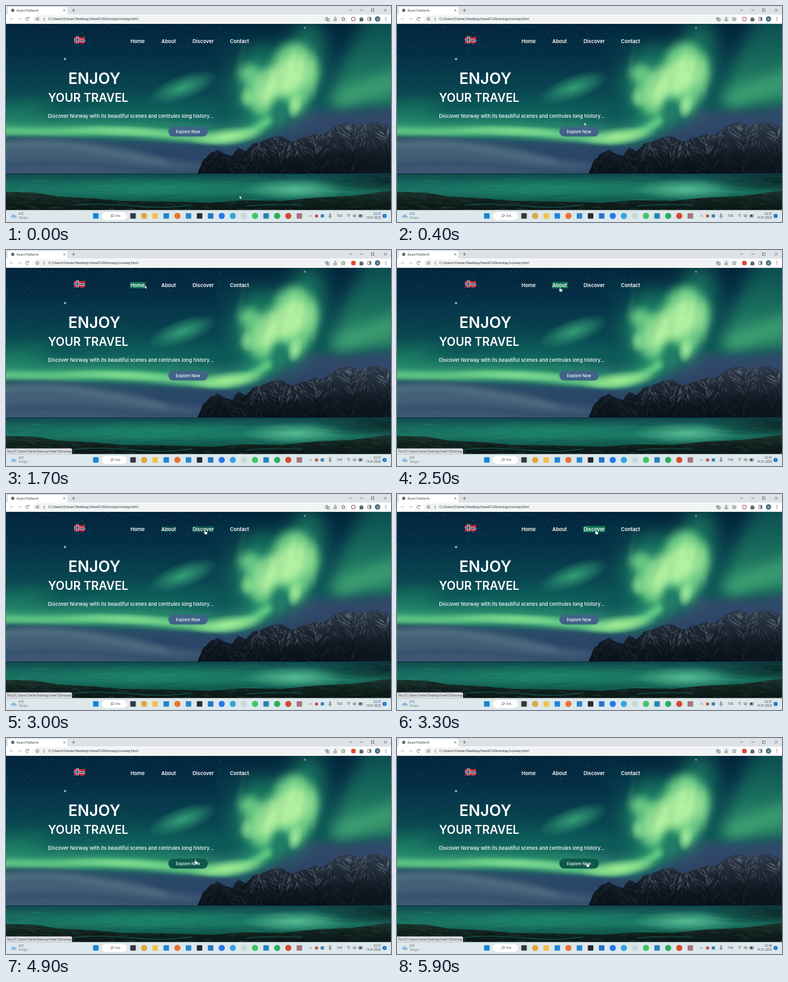
Recreate the animation shown at these times as an HTML page with a canvas. Size 600 px wide and 338 px high, loop 6000 ms.

```html
<!DOCTYPE html>
<html lang="en">
<head>
<meta charset="utf-8">
<title>Northern lights page</title>
<style>
html, body { margin: 0; width: 600px; height: 338px; overflow: hidden; background: #06283a; }
canvas, svg { position: absolute; left: 0; top: 0; width: 600px; height: 338px; }
text { font-family: Inter, sans-serif; white-space: pre; }
.ui { font-family: Roboto, sans-serif; fill: #4a4f55; }
.page { fill: #fff; }
.nav { font-size: 7.8px; font-weight: 600; }
.line { fill: none; stroke: #5f6368; stroke-width: .8; }
.faint { stroke: #b9bcc0; }

.anim, .hover, #cursor { animation: 6s linear infinite; }
.step { animation: 6s step-end infinite; }
.hover { fill: #0d7454; opacity: 0; }
#home { animation-name: home; }
#about { animation-name: about; }
#discover { animation-name: discover; }
#contact { animation-name: contact; }
#press { fill: #0c584b; animation-name: press; }
#status { animation-name: status; }
#rec { animation-name: rec; }
#before { animation-name: before; }
#after { animation-name: after; }
#cursor { animation-name: travel; animation-timing-function: ease-in-out; }
#hand { animation-name: hand; }
#arrow { animation-name: arrow; }

@keyframes home { 0%, 14.2% { opacity: 0 } 22.5%, 28.3% { opacity: 1 } 35%, to { opacity: 0 } }
@keyframes about { 0%, 30% { opacity: 0 } 38.3%, 44.8% { opacity: 1 } 51.6%, to { opacity: 0 } }
@keyframes discover { 0%, 46.2% { opacity: 0 } 54%, 59.2% { opacity: 1 } 65%, to { opacity: 0 } }
@keyframes contact { 0%, 60.8% { opacity: 0 } 69.2%, 70.3% { opacity: 1 } 75%, to { opacity: 0 } }
@keyframes press { 0%, 73.3% { opacity: 0 } 75%, 81.6% { opacity: .6 } 81.65%, to { opacity: 1 } }
@keyframes status { 0% { opacity: 0 } 20%, to { opacity: 1 } }
@keyframes rec { 0% { opacity: 0 } 11.6% { opacity: 1 } 50% { opacity: 0 } 58.3%, to { opacity: 1 } }
@keyframes before { 0% { opacity: 1 } 88.3%, to { opacity: 0 } }
@keyframes after { 0% { opacity: 0 } 88.3%, to { opacity: 1 } }
@keyframes travel {
  0% { transform: translate(364px, 296.5px); animation-timing-function: ease-in }
  6.66%, 11.6% { transform: translate(292px, 182px) }
  11.65% { transform: translate(226px, 90px); animation-timing-function: ease-out }
  15%, 26.6% { transform: translate(204px, 54px) }
  31.7%, 43.3% { transform: translate(254px, 58px) }
  48.3%, 57.5% { transform: translate(310px, 56px) }
  62.5%, 69.2% { transform: translate(363px, 54px) }
  75%, 81.6% { transform: translate(295px, 190px) }
  88.3%, to { transform: translate(296px, 194.5px) }
}
@keyframes hand {
  0% { opacity: 0 } 14.2% { opacity: 1 } 28.3% { opacity: 0 } 30% { opacity: 1 } 44.8% { opacity: 0 }
  46.2% { opacity: 1 } 59.2% { opacity: 0 } 60.8% { opacity: 1 } 70.3% { opacity: 0 } 74.7%, to { opacity: 1 }
}
@keyframes arrow {
  0% { opacity: 1 } 14.2% { opacity: 0 } 28.3% { opacity: 1 } 30% { opacity: 0 } 44.8% { opacity: 1 }
  46.2% { opacity: 0 } 59.2% { opacity: 1 } 60.8% { opacity: 0 } 70.3% { opacity: 1 } 74.7%, to { opacity: 0 }
}
</style>
</head>
<body>
<canvas id="scene" width="600" height="338"></canvas>
<svg viewBox="0 0 600 338">
  <!-- browser frame -->
  <rect width="600" height="14" fill="#dee1e6"/>
  <path d="M1 14q2 0 2-2V4q0-2.500 2.500-2.500H93q2.500 0 2.500 2.500V12q0 2 2 2z" fill="#fff"/>
  <rect y="13.500" width="600" height="14.500" fill="#fff"/>
  <rect y="27.400" width="600" height=".6" fill="#d5d8dc"/>
  <circle cx="10.500" cy="6.800" r="2.500" fill="#5f6368"/>
  <text class="ui" x="16.500" y="8.500" font-size="5">RoamTheNorth</text>
  <path class="line" d="M89.300 5.300l3 3m0-3l-3 3M102.700 6.700h5m-2.500-2.500v5M535 5.500l2 2 2-2M552 6.500h4.500M569.500 4.500h4v4h-4zM589 4.500l4 4m0-4l-4 4"/>
  <path class="line faint" d="M11.500 20.300h-5m2-2l-2 2 2 2M18.500 20.300h5m-2-2l2 2-2 2"/>
  <path class="line" d="M35.300 19a2.400 2.400 0 1 0 .1 2.400M35.500 17.300v1.900h-1.900"/>
  <rect x="42" y="14.800" width="490" height="11.200" rx="5.600" fill="#f1f3f4"/>
  <circle class="line" cx="49" cy="20.300" r="2.200"/>
  <path class="line" d="M49 19.800v1.500M59.500 18v5"/>
  <text class="ui" x="66" y="22.200" font-size="5.600" style="fill:#33373b">C:/Users/Owner/Desktop/travel%20norway/norway.html</text>
  <path class="line" d="M498 18h3v4h-3zM500.500 19.500h3v4h-3zM511 20v3h4v-3M513 22v-5l1.800 1.800M525.500 17.400l.9 1.900 2.100.2-1.600 1.400.5 2-1.900-1.100-1.900 1.100.5-2-1.600-1.400 2.100-.2z"/>
  <rect x="538.700" y="17.700" width="5.400" height="5.400" rx="1" fill="none" stroke="#8a3b34" stroke-width=".9"/>
  <rect class="step" id="rec" x="538.200" y="17.200" width="6.400" height="6.400" rx="1" fill="#e6452f"/>
  <path d="M551 18.500h1.800a1 1 0 0 1 2 0h1.700v1.800a1 1 0 0 1 0 2v1.600h-5.500z" fill="#5f6368"/>
  <path class="line" d="M563.800 17.800h5v5h-5z"/><path d="M566.500 17.800h2.300v5h-2.300z" fill="#5f6368"/>
  <circle cx="579" cy="20.300" r="4.200" fill="#4b7186"/>
  <text x="577.700" y="21.900" font-size="4" fill="#fff">H</text>
  <g fill="#5f6368"><circle cx="592" cy="18" r=".7"/><circle cx="592" cy="20.300" r=".7"/><circle cx="592" cy="22.600" r=".7"/></g>

  <!-- page -->
  <path d="M106 49q4.500-2.800 9-.7t8-.7v10.200q-4 2.200-8 .5t-9 .9z" fill="#c9303d"/>
  <g fill="none" stroke="#fff" stroke-width="3">
    <path d="M111.300 47.200v11.300M106 54q4.500-2.400 9-.6t8-.5"/>
    <path d="M111.300 47.200v11.300M106 54q4.500-2.400 9-.6t8-.5" stroke="#1f3564" stroke-width="1.500"/>
  </g>
  <rect class="hover" id="home" x="193.500" y="50" width="24" height="10"/>
  <rect class="hover" id="about" x="241.500" y="50" width="25" height="10"/>
  <rect class="hover" id="discover" x="290.500" y="50" width="34" height="10"/>
  <rect class="hover" id="contact" x="348.500" y="50" width="32.500" height="10"/>
  <g class="page">
    <g class="nav">
      <text x="194" y="57.800">Home</text>
      <text x="242" y="57.800">About</text>
      <text x="290.700" y="57.800">Discover</text>
      <text x="349" y="57.800">Contact</text>
    </g>
    <text x="97" y="121.700" font-size="24" font-weight="600">ENJOY</text>
    <text x="65.500" y="149.800" font-size="18" font-weight="600">YOUR TRAVEL</text>
    <text x="65.500" y="174.700" font-size="7.690" font-weight="500">Discover Norway with its beautiful scenes and centruies long history...</text>
  </g>
  <rect x="253" y="188.700" width="61.500" height="15.600" rx="7.800" fill="#416487"/>
  <rect class="hover" id="press" x="253" y="188.700" width="61.500" height="15.600" rx="7.800"/>
  <text class="page" x="264.800" y="198.800" font-size="6.250" font-weight="500">Explore Now</text>
  <g class="step" id="status">
    <path d="M0 310.500h101q2 0 2 2v7H0z" fill="#dee1e6"/>
    <text class="ui" x="2" y="317" font-size="4.600">file:///C:/Users/Owner/Desktop/travel%20norway/#</text>
  </g>

  <!-- taskbar -->
  <rect y="319.300" width="600" height="18.700" fill="#dde8ec"/>
  <path d="M9.500 331.500a2 2 0 0 1 .4-4 2.700 2.700 0 0 1 5 .8 1.600 1.600 0 0 1 .3 3.200z" fill="#8fb9dd"/>
  <text class="ui" x="20" y="327" font-size="4.800">6°C</text>
  <text class="ui" x="20" y="333" font-size="4.600" style="fill:#7b858c">Rüzgar</text>
  <rect x="149.500" y="322.300" width="39" height="12.400" rx="6.200" fill="#fff"/>
  <circle class="line" cx="165.800" cy="327.800" r="1.800"/><path class="line" d="M164.500 329.200l-1.700 1.800"/>
  <text class="ui" x="170" y="330.300" font-size="5.200">Ara</text>
  <g id="apps"></g>
  <path class="line" d="M472.500 329.500l2-2 2 2M504.300 325h1.600v4h-1.600zM503 328.500q0 2 2.100 2t2.100-2M505.100 330.500v1.700M531.500 327q2.500-2.300 5 0M532.600 328.700q1.400-1.200 2.800 0M541 327.300h1l1.500-1.500v5l-1.500-1.500h-1zM545.300 326.800q1 1.500 0 3M550 326.500h5.500v3.800H550z"/>
  <path d="M550.500 327h3.500v2.800h-3.500zM533.300 330l.7-.6.7.6-.7.8z" fill="#4a4f55"/>
  <text class="ui" x="515.500" y="330" font-size="4.700">TUR</text>
  <g text-anchor="end">
    <text class="ui step" id="before" x="584.500" y="326.800" font-size="4.700">22:57</text>
    <text class="ui step" id="after" x="584.500" y="326.800" font-size="4.700">22:58</text>
    <text class="ui" x="584.500" y="333" font-size="4.700">14.01.2023</text>
  </g>
  <circle cx="590" cy="328.500" r="3.200" fill="#1672c4"/>
  <text x="589" y="330" font-size="4" fill="#fff">1</text>

  <g id="cursor" fill="#fff" stroke="#1b2a2c" stroke-width=".35">
    <path class="step" id="arrow" d="M0 0v5.300l1.200-1.100.9 2 .9-.4-.9-1.900h1.700z"/>
    <path class="step" id="hand" d="M-.7.400q.7-.9 1.400 0v2.400l2.500.6q.9.300.7 1.400l-.5 2.500H0L-1.900 4.700q.3-1 1.200-.2z"/>
  </g>
</svg>
<script>
const g = document.getElementById('scene').getContext('2d');
let seed = 11;
const rnd = () => (seed = seed * 16807 % 2147483647) / 2147483647;

function blend(y0, y1, ...colors) {
  const grad = g.createLinearGradient(0, y0, 0, y1);
  colors.forEach((c, i) => grad.addColorStop(i / (colors.length - 1), c));
  return grad;
}
function glow(x, y, rx, ry, deg, color, alpha) {
  g.save();
  g.translate(x, y);
  g.rotate(deg * Math.PI / 180);
  g.scale(rx, ry);
  const grad = g.createRadialGradient(0, 0, 0, 0, 0, 1);
  grad.addColorStop(0, color);
  grad.addColorStop(.5, color + '88');
  grad.addColorStop(1, color + '00');
  g.globalAlpha = alpha;
  g.fillStyle = grad;
  g.fillRect(-1, -1, 2, 2);
  g.restore();
}
function soft(blur, alpha, draw) {
  g.save();
  g.filter = `blur(${blur}px)`;
  g.globalAlpha = alpha;
  draw();
  g.restore();
}
const shape = (d, color) => { g.fillStyle = color; g.fill(new Path2D(d)); };
const stroke = (d, color, width) => {
  g.strokeStyle = color;
  g.lineWidth = width;
  g.stroke(new Path2D(d));
};

function stars() {
  g.fillStyle = '#c3e8ec';
  for (let i = 0; i < 150; i++) {
    g.globalAlpha = .15 + rnd() * .5;
    const s = .4 + rnd() * .6;
    g.fillRect(rnd() * 370, 29 + rnd() * rnd() * 140, s, s);
  }
  g.globalAlpha = 1;
  glow(92, 83, 2.500, 2.500, 0, '#c9f4ff', 1);
  glow(466, 34, 2, 2, 0, '#c9f4ff', .8);
}

function sky() {
  g.fillStyle = blend(28, 263, '#03263c', '#052f47', '#08424f', '#0d5658', '#234c66', '#2e4a68');
  g.fillRect(0, 0, 600, 338);
  glow(20, 165, 70, 28, -8, '#1d7f62', .7);
  glow(275, 128, 58, 20, -20, '#37a87a', .9);
  glow(220, 165, 180, 30, 0, '#0f6a5e', .6);

  // right-hand curtain above a violet haze
  soft(12, .9, () => {
    shape('M505 160Q515 95 545 50L560 10H630V155Q560 150 505 160z', blend(28, 150, '#0d5353', '#1b7460', '#38996f'));
    stroke('M512 150Q560 132 620 108', '#4cb47b', 16);
  });
  soft(7, .95, () => shape('M470 160Q530 172 620 156V270H370L405 205z', blend(160, 240, '#354a6c', '#2b3f64')));

  // main curtain, from halo to core
  soft(15, .85, () => shape('M350 95Q378 55 415 65T455 28H485Q505 80 490 120T450 180L395 195Q350 150 350 95z', '#1f8767'));
  soft(7, .92, () => shape('M361 102Q378 82 392 98T422 72Q442 50 463 60Q493 85 486 112T450 174Q446 150 430 143T406 182Q384 165 370 148Q384 128 361 102z', '#78d68a'));
  soft(7, .95, () => shape('M390 136Q400 100 424 94Q446 68 467 80Q482 104 462 124Q440 142 420 136Q408 154 400 162z', '#b6f3a3'));
  glow(378, 142, 16, 18, 0, '#8fe093', .8);
  glow(450, 156, 12, 22, 12, '#a6ea9c', .9);
  glow(428, 172, 12, 22, 8, '#2a7c6c', .8);
  glow(346, 75, 32, 48, 0, '#063a4a', .7);
  soft(3, .13, () => {
    for (let i = 0; i < 45; i++) {
      const x = 365 + rnd() * 120, y = 45 + rnd() * 70;
      stroke(`M${x} ${y}l-6 ${25 + rnd() * 40}`, rnd() < .55 ? '#c4f7b0' : '#0b5a55', 3);
    }
  });

  // low green band
  soft(10, .9, () => stroke('M-20 187Q60 190 120 190T250 194T330 204Q380 200 410 178', '#2c9b70', 26));
  soft(4, .95, () => stroke('M-20 195Q60 198 120 196T250 202T330 209Q380 205 412 176', '#6ad287', 12));
  glow(345, 204, 60, 15, -6, '#a6ee94', .95);
  glow(190, 196, 110, 9, 2, '#84df92', .8);
  stars();

  // blue gap and cloud bank
  soft(2.500, .96, () => shape('M-15 206Q60 204 120 209T250 215T400 226V270H-15z', blend(206, 262, '#2a5066', '#2a4468', '#3c5472')));
  soft(4, .85, () => {
    shape('M-15 212Q60 204 130 214T230 234T312 250V262H-15z', blend(206, 262, '#48697a', '#49647a', '#41597a'));
    stroke('M-10 219Q60 210 120 222T250 246', '#5b7a89', 5);
    stroke('M-10 250Q90 242 180 253T310 257', '#294a62', 6);
  });
}

function mountains() {
  const ridge = [[298, 263], [306, 243], [320, 229], [331, 225], [343, 232], [352, 235], [362, 221], [372, 228],
    [386, 215], [400, 211], [414, 205], [430, 204], [445, 213], [458, 207], [482, 200], [494, 202],
    [511, 189], [532, 181], [551, 187], [566, 182], [583, 182], [601, 191]];
  const top = x => {
    const i = Math.max(1, ridge.findIndex(p => p[0] >= x)), [a, b] = [ridge[i - 1], ridge[i]];
    return a[1] + (b[1] - a[1]) * (x - a[0]) / (b[0] - a[0]);
  };
  let d = 'M298 263';
  for (let x = 299; x <= 600; x += 1.500) d += `L${x} ${top(x) + rnd() * 2.400 - 1}`;
  g.save();
  const path = new Path2D(d + 'L600 263z');
  g.fillStyle = blend(185, 263, '#2f3b4b', '#1f2935', '#111922', '#0a1118');
  g.fill(path);
  g.clip(path);
  for (let i = 0; i < 1400; i++) {
    const x = 300 + rnd() * 300, y = top(x), depth = rnd();
    const snow = x > 385 && depth < .45 && rnd() < .6;
    g.globalAlpha = snow ? .4 * (1 - depth) : .3;
    const lean = Math.sin(x / 9) * 7 + rnd() * 3;
    stroke(`M${x} ${y + depth * (262 - y)}l${lean} ${3 + rnd() * 7}`, snow ? '#a9b5c4' : rnd() < .2 ? '#414f60' : '#080f17', .9);
  }
  g.restore();
}

function water() {
  g.fillStyle = blend(263, 319, '#10494e', '#17695d', '#1a7563', '#115a4f', '#0a3f3b');
  g.fillRect(0, 263, 600, 60);
  glow(240, 284, 190, 16, 0, '#1f8f70', .6);
  glow(450, 287, 85, 17, 0, '#5fc79a', .85);
  glow(600, 274, 125, 22, 0, '#0a2427', .95);
  for (let i = 0; i < 260; i++) {
    g.globalAlpha = .16;
    const x = rnd() * 600, y = 265 + rnd() * 42;
    stroke(`M${x} ${y}h${8 + rnd() * 30}`, rnd() < .45 ? '#46bd91' : '#07403b', .7);
  }
  g.globalAlpha = 1;
  g.fillStyle = '#0d3940';
  g.fillRect(0, 262, 600, 1.200);

  const shore = new Path2D('M0 291L45 292L80 298L135 301L180 305L250 306L320 308L370 304L430 305L480 300L540 297L600 289V320H0z');
  g.save();
  g.fillStyle = blend(290, 320, '#1c352e', '#11221e', '#0a1716');
  g.fill(shore);
  g.clip(shore);
  for (let i = 0; i < 420; i++) {
    g.globalAlpha = .35;
    const x = rnd() * 600, y = 290 + rnd() * 30;
    stroke(`M${x} ${y}q5 -1.500 ${5 + rnd() * 14} ${rnd() * 2}`, rnd() < .4 ? '#34574a' : '#08110f', 1);
  }
  g.globalAlpha = .65;
  stroke('M105 312q45 -4 95 1t90 -2M375 313q45 -4 85 -1', '#14574d', 1.800);
  g.restore();
}

sky();
mountains();
water();

// plain marks for the pinned apps: 's' squares, 'o' discs
const apps = 's#1684d0 s#33383c o#dda83a s#f2c14b s#2086d3 o#ed7030 s#2788cc s#252a2e s#2774c8 o#2478ec o#36a5df o#c6dbd6 o#3fc55f s#2484b8 o#27ae5f o#d34b32 s#a8757a';
document.getElementById('apps').innerHTML = apps.split(' ').map((app, i) => {
  const x = i ? 180.700 + i * 17.280 : 140, fill = app.slice(1);
  return app[0] === 'o' ? `<circle cx="${x}" cy="328.500" r="4.800" fill="${fill}"/>`
    : `<rect x="${x - 4.300}" y="324.200" width="8.600" height="8.600" rx="1" fill="${fill}"/>`;
}).join('') + '<circle cx="484" cy="328.500" r="2.600" fill="#c5534c"/><rect x="490.500" y="326" width="5" height="5" fill="#3d7fae"/>';
</script>
</body>
</html>
```
